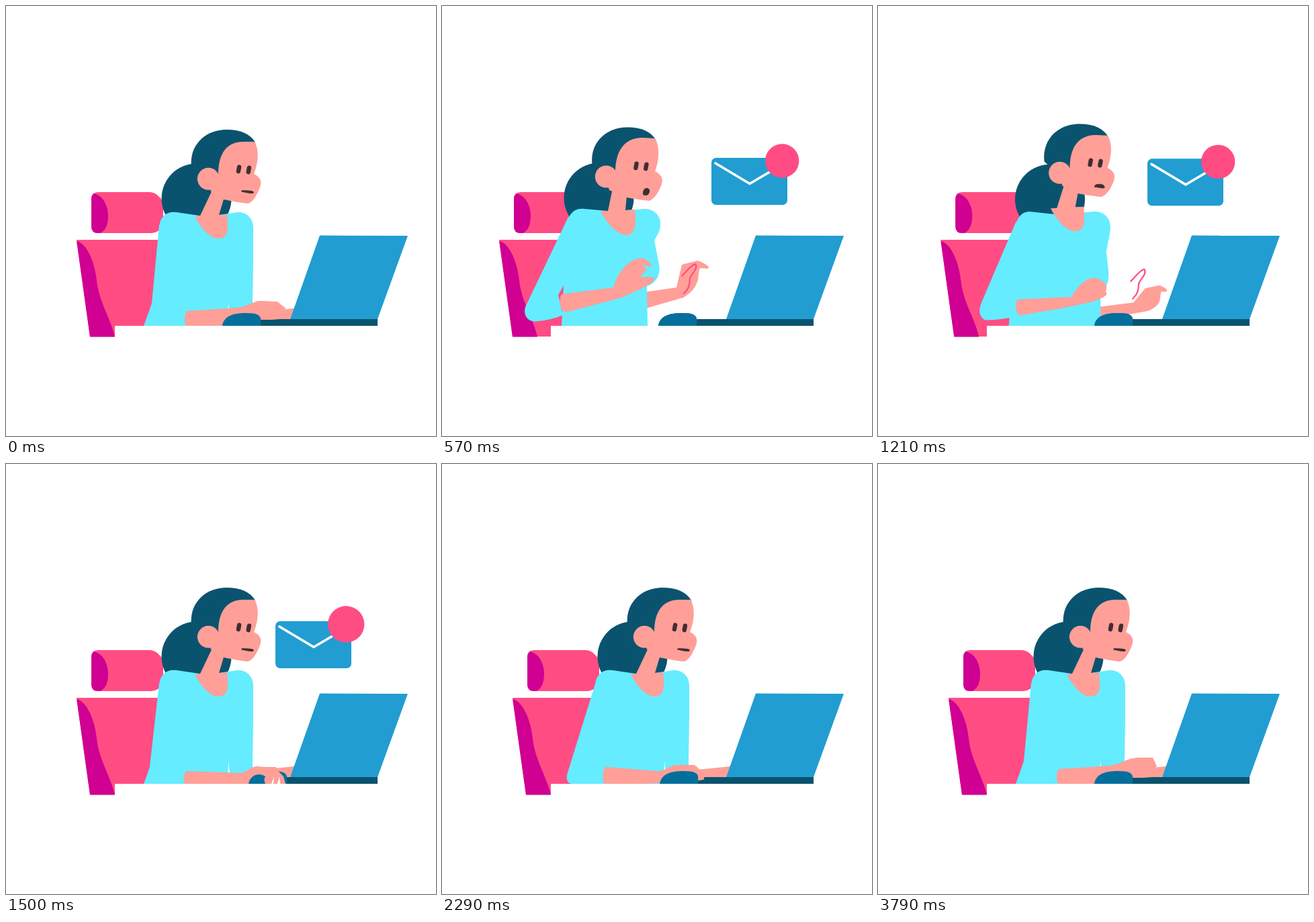
Animation of 640 by 640 pixels, one loop 3870 ms. Source, as an HTML page:

```html
<!DOCTYPE html>
<html lang="en">
<head>
<meta charset="utf-8">
<title>New message</title>
<style>
html, body { margin: 0; width: 100%; height: 100%; overflow: hidden; background: #fff; }
svg { display: block; width: 100vw; height: 100vh; }
.pink { fill: #ff4d84; } .plum { fill: #cf0092; } .shirt { fill: #65ecff; }
.skin { fill: #ff9f98; } .hair { fill: #0a536f; } .blue { fill: #219dd1; }
.navy { fill: #046f9c; } .ink { fill: #402f32; } .white { fill: #fff; }
</style>
</head>
<body>
<svg viewBox="0 0 640 640">
  <g id="chair">
    <path class="pink" d="M137,277 H215 Q226,278 234,292 V320 Q232,337 216,338 H137 Q127,338 127,328 V287 Q127,277 137,277Z"/>
    <path class="plum" d="M131,279 C146,283 152,299 152,313 C152,328 146,336 140,338 H137 Q127,338 127,328 V288 Q127,282 131,279Z"/>
    <path class="pink" d="M105,348 H250 V492 H125Z"/>
    <path class="plum" d="M105,349 L125,492.5 H162 C156,465 138,440 135,408 C131,375 118,352 105,350Z"/>
  </g>
  <g id="bun"><circle class="hair" cx="283.5" cy="286.5" r="52"/></g>
  <path id="farArm" class="skin"/>
  <path id="crease" fill="none" stroke="#ff4d84" stroke-width="2.2" stroke-linecap="round"
    d="M357,402 C365,394 370,386 377,384 C382,390 372,398 369,405 C368,412 370,418 360,428"/>
  <path class="hair" d="M378,466 H553 V476 H378Z"/>
  <path id="lid" class="blue" d="M467,341.5 L598,342 L553,466 H423Z"/>
  <path id="torso" class="shirt"/>
  <path id="sleeve" class="shirt"/>
  <path id="slit" class="white" d="M331,442 L333,459 H330.5Z"/>
  <g id="head">
    <path id="neck" class="skin"/>
    <g id="cap"><path class="hair" d="M276,240 C272,206 298,184 328,184 C350,184 364,191 371,203 L345,245 L300,262Z"/></g>
    <path id="face" class="skin"/>
    <g id="ear"><circle class="skin" r="16.5"/></g>
    <g id="eyes">
      <rect class="ink eye" x="-3.2" y="-6.5" width="6.4" height="13" rx="3.2"/>
      <rect class="ink eye" x="-3.2" y="-6.5" width="6.4" height="13" rx="3.2"/>
    </g>
    <path id="mouth" class="ink" stroke="#402f32" stroke-width="1"/>
  </g>
  <path id="mouse" class="navy" d="M322,476 C324,462 337,457 358,457 C373,457 380,460 379,468 V476Z"/>
  <path id="nearArm" class="skin"/>
  <g id="grip">
    <path class="navy" d="M361,476 C363,466 370,462 377,462 Q382,462 386,465 Q383,470 386,476Z"/>
    <path class="white" d="M395,476 L399,465 L398,476Z M404,476 L407,465 L408,476Z"/>
  </g>
  <path id="mouseTop" class="navy" d="M322,476 C324,462 337,457 358,457 C373,457 380,460 379,468 V476Z"/>
  <path class="white" d="M162,476 H640 V640 H162Z"/>
  <g id="mail">
    <rect class="blue" x="-56.5" y="-35" width="113" height="70" rx="7"/>
    <path d="M-50.5,-27 L0.5,3.5 L53,-27.5" fill="none" stroke="#fff" stroke-width="3.6" stroke-linecap="round"/>
    <circle id="badge" class="pink" cx="48.7" cy="-30.5"/>
  </g>
</svg>
<script>
const LOOP = 3870, FPS = 14, LAST = 53;
const $ = id => document.getElementById(id);
const clamp = x => Math.max(0, Math.min(1, x));
const smooth = x => x * x * (3 - 2 * x);
const bump = (t, a, b) => Math.sin(Math.PI * clamp((t - a) / (b - a)));

// blends two strings of equal structure number by number
function mix(a, b, k) {
  if (k === 0 || a === b) return a;
  const to = b.match(/-?[\d.]+/g);
  let n = 0;
  return a.replace(/-?[\d.]+/g, v => {
    const x = +v;
    return (x + (to[n++] - x) * k).toFixed(2);
  });
}

function segment(keys, t) {
  let i = 0;
  while (i < keys.length - 2 && t >= keys[i + 1][0]) i++;
  const [t0, a] = keys[i], [t1, b] = keys[i + 1];
  return [a, b, smooth(clamp((t - t0) / (t1 - t0)))];
}
function value(keys, t) {
  const [a, b, k] = segment(keys, t);
  return a + (b - a) * k;
}

const fingers = [
  'L385,439 L400,440 L404,440 L410,445 L417,450 L413,452',
  'L385,439 L401,437 L402,440 L412,440 L413.5,450 L413,452',
  'L385,437 L400,437 L409,437 L412,443 L415,450 L413,452'
];
const typing = n => 'M269,454 L331,450 C345,449 352,448 357,446 C364,443 369,441 375,439 ' + fingers[n] +
  ' C411,458 410,463 408,466 C400,467 390,467 379,467 L360,476 L268,476 C265,470 265,460 269,454Z';

// poses: typing, startled, leaning, mouse right, mouse left, mouse far left
const shapes = {
  farArm: [
    'M330,462 L380,455 L410,452 L428,450 C430,450 430,452 430,453 L430,456 L430,458 C430,460 430,462 429,464 C425,466 420,466 410,466 L330,470Z',
    'M300,426 L349,419 L357,385 L380,379 C386,380 392,384 397,388 L396,391 L384,390 C381,395 383,405 379,413 C375,423 366,430 359,434 L300,451Z',
    'M300,442 L381,432 L389,399 L412,393 C418,394 424,398 430,401 L429,405 L416,403 C413,408 415,418 411,427 C407,436 398,444 391,447 L300,470Z'
  ],
  torso: [
    'M228,330 C229,312 240,305 254,307 L288,312 L317,311 L344,307 C358,306 368,316 368,330 C368,345 368,360 368,375 L367.6,400 C367.5,420 367,430 367,445 L367,476 L218,476 L222,400Z',
    'M189,314 C195,303 203,301 212,302 L247,305 L273,304 L302,302 C315,302 326,312 325,325 C325,337 318,344 316,349 L323,385 C326,400 318,413 305,417 L306,476 L178,476 L181,416Z',
    'M190,320 C198,305 207,304 215,306 L251,309 L278,307 L308,305 C322,306 331,316 331,328 C331,338 323,350 321,360 L327,395 C328,410 318,417 307,418 L308,476 L179,476 L187,397Z'
  ],
  sleeve: [
    'M228,326 L217,442 C214,452 209,464 205,476 C225,476 250,476 268,476 L269,454 L290,400 L260,315Z',
    'M188,314 L124,448 C120,462 130,472 143,469 C155,468 168,465 180,460 L173,430 L181,416 L230,320Z',
    'M190,318 L112,440 C107,452 115,463 130,462 C147,461 162,457 176,450 L167,423 L187,397 L230,320Z',
    'M228,326 L214,450 C211,460 208,468 205,476 C225,476 250,476 266,476 L269,457 L290,400 L260,315Z',
    'M229,324 L188,462 C186,468 187,476 194,476 C210,476 230,476 243,476 L245,452 L290,400 L260,315Z'
  ],
  nearArm: [
    typing(0),
    'M178,429 L255,419 C260,400 272,385 285,378 C293,375 299,374 303,377 L312,385 L309,389 L299,384 L304,393 L297,401 L295,404 C303,403 310,402 316,405 C317,409 310,414 296,421 L267,434 L184,456 C175,452 173,437 178,429Z',
    'M167,423 L247,415 C252,397 264,383 276,377 C284,374 290,373 295,376 L305,384 L301,388 L291,383 L295,390 L290,397 L290,400 C296,399 302,398 307,401 C308,405 301,411 288,417 L257,432 L175,450 C165,447 162,431 167,423Z',
    'M269,457 L350,460 C356,457 361,455 364,453 C368,451 371,450 374,450 L385,451 L402,451 L403,453 L408,460 L413,465 L416,476 C405,476 395,476 386,476 C376,476 370,476 361,476 L300,476 L266,476 C263,470 264,462 269,457Z',
    'M245,452 L330,460 C336,457 340,455 343,453 C346,451 349,450 352,451 L362,451 L378,451 L381,454 L386,461 L391,465 L393,476 C382,476 372,476 363,476 C353,476 347,476 338,476 L290,476 L243,476 C240,470 240,460 245,452Z'
  ],
  neck: [
    'M308,266 L307,274 L289,312 L281,313 C290,330 303,346 316,346 C331,346 330,332 330,325 L329,310 L317,311 L325,284Z',
    'M252,262 L253,276 L247,305 L236,305 C246,325 262,341 274,341 C286,341 288,328 288,318 L287,303 L273,304 L275,282Z',
    'M257,266 L256,280 L251,309 L241,309 C250,328 266,344 279,344 C290,344 292,332 292,322 L291,307 L278,307 L280,286Z'
  ],
  face: [
    'M316,250 C316,220 328,202 354,202 L370,202 C377,214 376,232 369,250 C379,255 381,261 378,270 C374,280 368,292 360,294 C350,293 335,290 324,288 L305,276 L301,262Z',
    'M258,248 C258,215 272,196 298,196 L317,197 C324,208 324,228 317,246 C327,251 329,257 327,265 C323,276 316,288 308,290 C298,289 286,287 275,285 L249,274 L244,260Z',
    'M265,252 C265,220 278,201 304,201 L323,202 C330,213 330,232 323,250 C333,255 335,261 333,269 C329,280 322,291 314,293 C304,292 292,291 281,289 L254,278 L250,264Z'
  ],
  mouth: [
    'M350.5,276 C350.5,274 355,274.8 360,275 C366,275.4 368.5,276 368.5,277.5 C368,279.4 362,278.6 350.5,276Z',
    'M299.5,280.5 C299,274 302,270.5 306,271.5 C309.5,272.5 309,277 307,280 C304,282.5 301,281.5 299.5,280.5Z',
    'M303.5,280.5 C303.5,276 307,274.5 311,274.5 C315.5,275 317,279 315.5,281.5 C312,282.5 306,279 303.5,280.5Z'
  ]
};
for (const id of ['sleeve', 'nearArm']) shapes[id].push(mix(shapes[id][3], shapes[id][4], 1.5));

const moves = {
  chair: ['translate(0,0)', 'translate(-20,0)', 'translate(-19.6,0)'],
  bun: ['translate(0,0)', 'translate(-50,-1)', 'translate(-46,2)'],
  cap: ['translate(0,0)', 'translate(-52.5,-3.5)', 'translate(-47.5,1.5)'],
  ear: ['translate(301.3,257.3)', 'translate(244.3,254)', 'translate(250,258)'],
  eyes: ['translate(346.5,242.8)', 'translate(289,237.8)', 'translate(295.8,242)'],
  crease: ['translate(0,0)', 'translate(0,0)', 'translate(32,13)']
};

const poseKeys = [[0, 0], [90, 0], [400, 1], [570, 1], [1070, 2], [1072, 2], [1400, 3],
  [1640, 3], [2070, 4], [2210, 5], [2430, 0], [LOOP, 0]];
const mouseKeys = [[0, 0], [1250, 0], [1400, 39], [1640, 39], [2070, 16], [2210, 4.5], [2360, 0], [LOOP, 0]];
const mailY = [[0, 275], [140, 275], [360, 255], [570, 261], [820, 268], [1070, 260],
  [1500, 269], [1790, 256.5], [2070, 265], [2280, 262], [LOOP, 262]];
const mailSize = [[0, 0], [130, 0], [330, 1], [2120, 1], [2280, 0], [LOOP, 0]];
const badgeR = [[0, 0], [260, 0], [430, 27], [540, 25.2], [1400, 25.2], [1520, 27.3], [1571, 27.3], [1710, 0], [LOOP, 0]];

const eyes = [...document.querySelectorAll('.eye')];
const show = (id, on) => $(id).setAttribute('visibility', on ? 'visible' : 'hidden');
const move = (id, s) => $(id).setAttribute('transform', s);

function draw(frame) {
  const t = frame * 1000 / FPS;
  const [a, b, k] = segment(poseKeys, t);
  shapes.nearArm[0] = typing([0, 2, 0, 1][frame % 4]);
  const pose = list => mix(list[a] || list[0], list[b] || list[0], k);
  for (const id in shapes) $(id).setAttribute('d', pose(shapes[id]));
  for (const id in moves) move(id, pose(moves[id]));

  const hop = -7.5 * bump(t, 90, 450) - 10 * bump(t, 1072, 1440);
  move('head', `translate(0,${hop})`);
  const blink = t > 2420 && t < 2580 ? 0.15 : 1;
  eyes.forEach((e, i) => e.setAttribute('transform',
    `translate(${i * 14.8},${i * 1.1}) rotate(10) scale(1,${blink})`));

  const m = value(mouseKeys, t), grip = t > 1340 && t < 2280;
  move('mouse', `translate(${m},0)`);
  move('mouseTop', `translate(${m},0)`);
  move('grip', `translate(${m - 39},0)`);
  show('grip', grip);
  show('mouseTop', !grip);
  show('slit', t < 90 || t > 1390);
  show('crease', t > 330 && t < 1220);

  move('lid', `translate(0,466) skewX(${-1.4 * bump(t, 70, 430)}) translate(0,-466)`);
  const size = value(mailSize, t);
  move('mail', `translate(457.5,${value(mailY, t)}) scale(${size})`);
  show('mail', size > 0);
  $('badge').setAttribute('r', value(badgeR, t));
}

function tick() {
  const t = performance.now() % LOOP;
  draw(Math.min(LAST, Math.floor((t + 5) * FPS / 1000)));
  requestAnimationFrame(tick);
}
tick();
</script>
</body>
</html>
```
